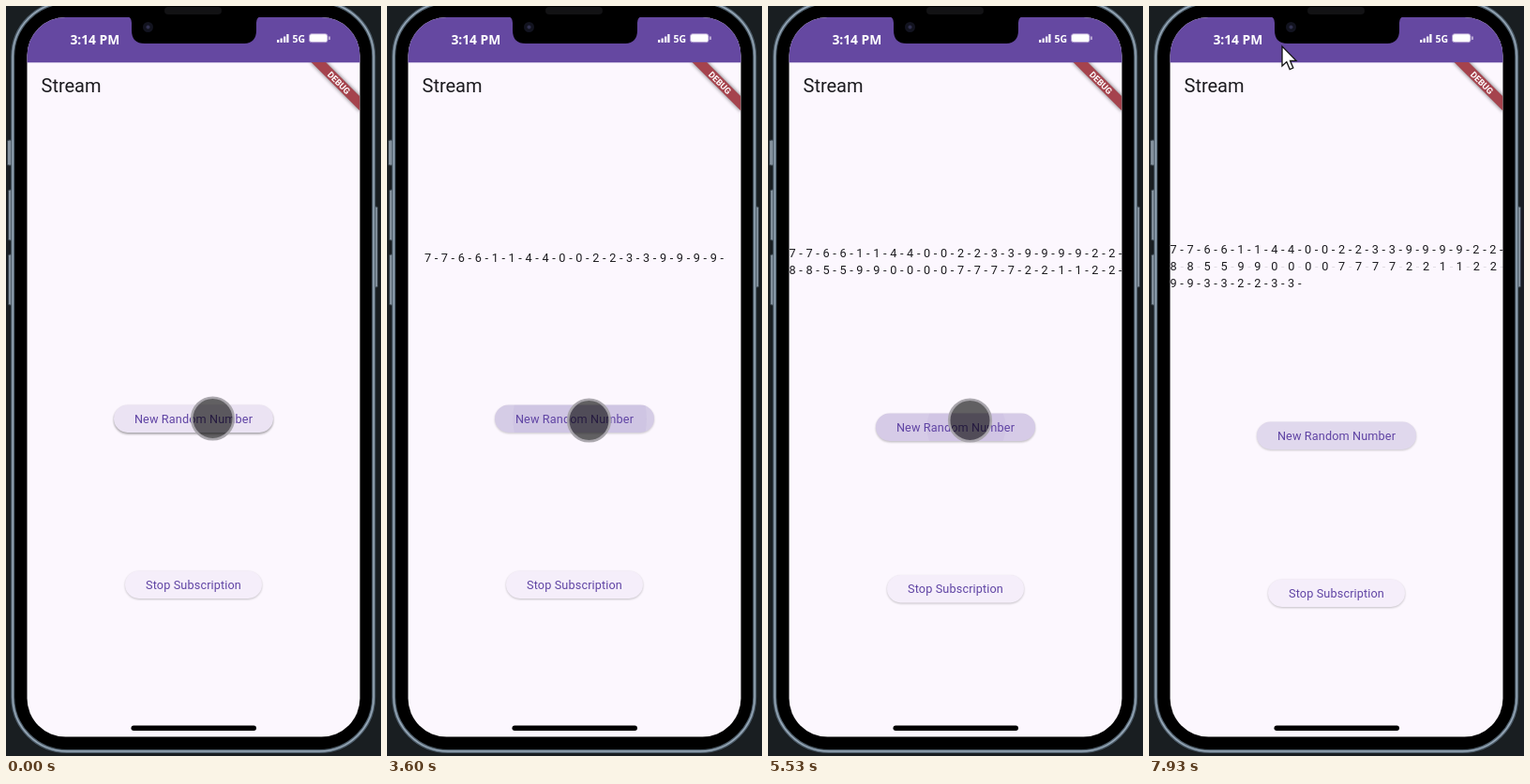
These frames come from a looping animation (400x800 px, 8 s). An HTML page:

```html
<!DOCTYPE html>
<html lang="en">
<head>
<meta charset="utf-8">
<title>Stream</title>
<style>
  html, body { margin: 0; width: 100%; height: 100%; overflow: hidden; background: #191e21; }
  svg { display: block; width: 100vw; height: 100vh; }
  text { font-family: Roboto, sans-serif; white-space: pre; }
  .status { font-family: "Noto Sans", sans-serif; font-weight: 700; fill: #fff; }
  .numbers { font-size: 12.7px; letter-spacing: .25px; fill: #1c1b1f; }
  .label { font-size: 12.7px; letter-spacing: .12px; fill: #6044a4; text-anchor: middle; }
</style>
</head>
<body>
<svg viewBox="0 0 400 800">
  <defs>
    <clipPath id="screen"><rect x="22.5" y="12" width="355" height="767.5" rx="41"/></clipPath>
    <clipPath id="page"><rect x="22.5" y="60" width="355" height="720"/></clipPath>
    <clipPath id="pill"><rect x="-85" y="-14.7" width="170" height="29.4" rx="14.7"/></clipPath>
    <filter id="soft" x="-20%" y="-80%" width="140%" height="260%"><feGaussianBlur stdDeviation="1.3"/></filter>
    <filter id="softer" x="-20%" y="-80%" width="140%" height="260%"><feGaussianBlur stdDeviation="2.2"/></filter>
  </defs>

  <!-- Phone body -->
  <rect width="400" height="800" fill="#191e21"/>
  <g fill="#84919d" stroke="#354049">
    <rect x="1.5" y="143" width="5" height="27" rx="1.5"/>
    <rect x="2.5" y="196" width="5" height="54" rx="1.5"/>
    <rect x="2.5" y="265" width="5" height="54" rx="1.5"/>
    <rect x="392" y="214" width="4.5" height="86" rx="1.5"/>
  </g>
  <rect x="7.2" y="-4" width="385" height="799" rx="58" fill="#000" stroke="#50606d" stroke-width="4"/>
  <rect x="7.2" y="-4" width="385" height="799" rx="58" fill="none" stroke="#98a9b9" stroke-width="1.5"/>
  <rect x="169" y="1" width="61" height="8" rx="4" fill="#121214"/>

  <!-- Screen -->
  <g clip-path="url(#screen)">
    <rect x="22" y="12" width="356" height="768" fill="#fcf7fe"/>
    <rect x="22" y="12" width="356" height="48.3" fill="#6548a1"/>
    <text x="37.5" y="92" font-size="20" fill="#1c1b1f">Stream</text>
    <g clip-path="url(#page)">
      <g transform="translate(377 60) rotate(45)">
        <rect x="-37" y="25.4" width="74" height="10.9" filter="url(#softer)" opacity=".6"/>
        <rect x="-37" y="25.4" width="74" height="10.9" fill="#a5434d"/>
        <text y="34.2" font-size="9.3" font-weight="700" fill="#fff" text-anchor="middle">DEBUG</text>
      </g>
    </g>
    <rect x="133.5" y="767.5" width="133.5" height="5.5" rx="2.7"/>
  </g>
  <path d="M129 11 Q134 12 134 18 V26 Q134 40 148 40 H253 Q267 40 267 26 V18 Q267 12 272 11 Z"/>
  <circle cx="151.5" cy="22.5" r="5.5" fill="#12131f"/>
  <circle cx="151.5" cy="22.5" r="2" fill="#30304f"/>
  <text class="status" x="68.4" y="40.5" font-size="13.8">3:14 PM</text>
  <text class="status" x="305.5" y="38.5" font-size="10.5">5G</text>
  <path d="M290.2 39v-3M293.7 39v-4.5M297.2 39v-6.5M300.4 39v-9" stroke="#fff" stroke-width="2.2"/>
  <rect x="323.5" y="29.7" width="19.5" height="9" rx="2.5" fill="#fff" stroke="#a994cb"/>
  <path d="M345 32.5v3.5" stroke="#cfc2e2" stroke-width="1.5"/>

  <!-- App content -->
  <text class="numbers"></text><text class="numbers"></text><text class="numbers"></text>
  <g id="random">
    <rect x="-85" y="-13.7" width="170" height="29.4" rx="14.7" opacity=".2" filter="url(#soft)"/>
    <rect id="raised" x="-85" y="-12.7" width="170" height="29.4" rx="14.7" filter="url(#soft)"/>
    <rect x="-85" y="-14.7" width="170" height="29.4" rx="14.7" fill="#ebe3f3"/>
    <g clip-path="url(#pill)" fill="#6750a4">
      <rect id="highlight" x="-85" y="-15" width="170" height="30"/>
      <g id="ripples"></g>
    </g>
    <text class="label" y="4.5">New Random Number</text>
  </g>
  <g id="stop">
    <rect x="-73" y="-13.7" width="146" height="29.4" rx="14.7" opacity=".22" filter="url(#soft)"/>
    <rect x="-73" y="-14.7" width="146" height="29.4" rx="14.7" fill="#f5eefa"/>
    <text class="label" y="4.5">Stop Subscription</text>
  </g>

  <!-- Pointers -->
  <g id="touch">
    <circle r="22" fill="#000" fill-opacity=".61"/>
    <circle r="22.3" fill="none" stroke="#a7a4aa" stroke-opacity=".95" stroke-width="2.6"/>
  </g>
  <path id="arrow" transform="translate(142 43)" d="M0 0V21L4.8 16.6L8.2 24.6L11.8 23L8.5 15.3H15Z" fill="#fff" stroke="#111" stroke-width="1.3"/>
</svg>
<script>
const LOOP = 8000, FPS = 15, RELEASE = 95, PER_ROW = 10;
const DIGITS = "761402399285900772129323";
const $ = id => document.getElementById(id);
const clamp = v => Math.max(0, Math.min(1, v));
const lerp = (a, b, p) => a + (b - a) * p;
const ramp = (t, from, to) => clamp((t - from) / (to - from));
const smooth = p => p * p * (3 - 2 * p);

// [index of tap, press time]: tapping is steady between these points
const RHYTHM = [[0, 1198], [4, 2330], [8, 3460], [16, 4780], [20, 5480], [21, 7300], [23, 7640]];
const taps = [...DIGITS].map((_, i) => {
  const k = Math.max(1, RHYTHM.findIndex(([n]) => n >= i));
  const [n0, t0] = RHYTHM[k - 1], [n1, t1] = RHYTHM[k];
  return lerp(t0, t1, (i - n0) / (n1 - n0));
});

const rows = [...document.querySelectorAll(".numbers")];
const ripples = taps.map(() => {
  const circle = document.createElementNS("http://www.w3.org/2000/svg", "circle");
  return $("ripples").appendChild(circle);
});
const place = (node, x, y) => node.setAttribute("transform", `translate(${x} ${y})`);
const glow = age => ramp(age, 0, 75) * (1 - ramp(age, 180, 360));
const leaving = t => smooth(ramp(t, 7735, 7930));

function drawNumbers(count, lines) {
  rows.forEach((row, r) => {
    const digits = DIGITS.slice(0, count).slice(r * PER_ROW, (r + 1) * PER_ROW);
    const line = [...digits].map(d => `${d} - ${d} -`).join(" ");
    // The middle row's dashes fade once a third row exists
    const faint = r === 1 && lines === 3;
    row.innerHTML = faint ? line.replace(/-/g, '<tspan fill-opacity=".12">-</tspan>') : line;
    row.setAttribute("text-anchor", lines > 1 ? "start" : "middle");
    row.setAttribute("x", lines > 1 ? 22.6 : 199.6);
    row.setAttribute("y", 272.5 - 4.5 * (lines - 1) + 18 * r);
  });
}

function drawButtons(t, lines) {
  place($("random"), 200, 440.2 + 9 * (lines - 1));
  place($("stop"), 200, 617.2 + 4.5 * (lines - 1));
  const pressed = Math.max(...taps.map(down => glow(t - down)));
  $("highlight").setAttribute("opacity", .16 * pressed);
  $("raised").setAttribute("opacity", .2 * (1 - pressed) * (1 - leaving(t)));
  ripples.forEach((circle, i) => {
    const age = t - taps[i], p = clamp(age / 225);
    circle.setAttribute("cx", lerp(15, 0, p));
    circle.setAttribute("r", lerp(24, 100, p));
    circle.setAttribute("opacity", .06 * glow(age));
  });
}

function drawPointer(t) {
  const settle = smooth(ramp(t, 0, 870)), leave = leaving(t);
  const x = lerp(220.5, 215.5, settle);
  const y = lerp(440, 442, settle) + 6 * ramp(t, 5800, 6070) + 4 * ramp(t, 6870, 7100);
  place($("touch"), lerp(x, 142, leave), lerp(y, 43, leave));
  const gone = t > 7900;
  $("touch").style.display = gone ? "none" : "";
  $("arrow").style.display = gone ? "" : "none";
}

function draw(now) {
  const t = Math.floor((now % LOOP + 4) * FPS / 1000) * 1000 / FPS;
  const count = taps.filter(down => t >= down + RELEASE).length;
  const lines = Math.max(1, Math.ceil(count / PER_ROW));
  drawNumbers(count, lines);
  drawButtons(t, lines);
  drawPointer(t);
}

const start = performance.now();
function tick() {
  draw(performance.now() - start);
  requestAnimationFrame(tick);
}
tick();
</script>
</body>
</html>
```
